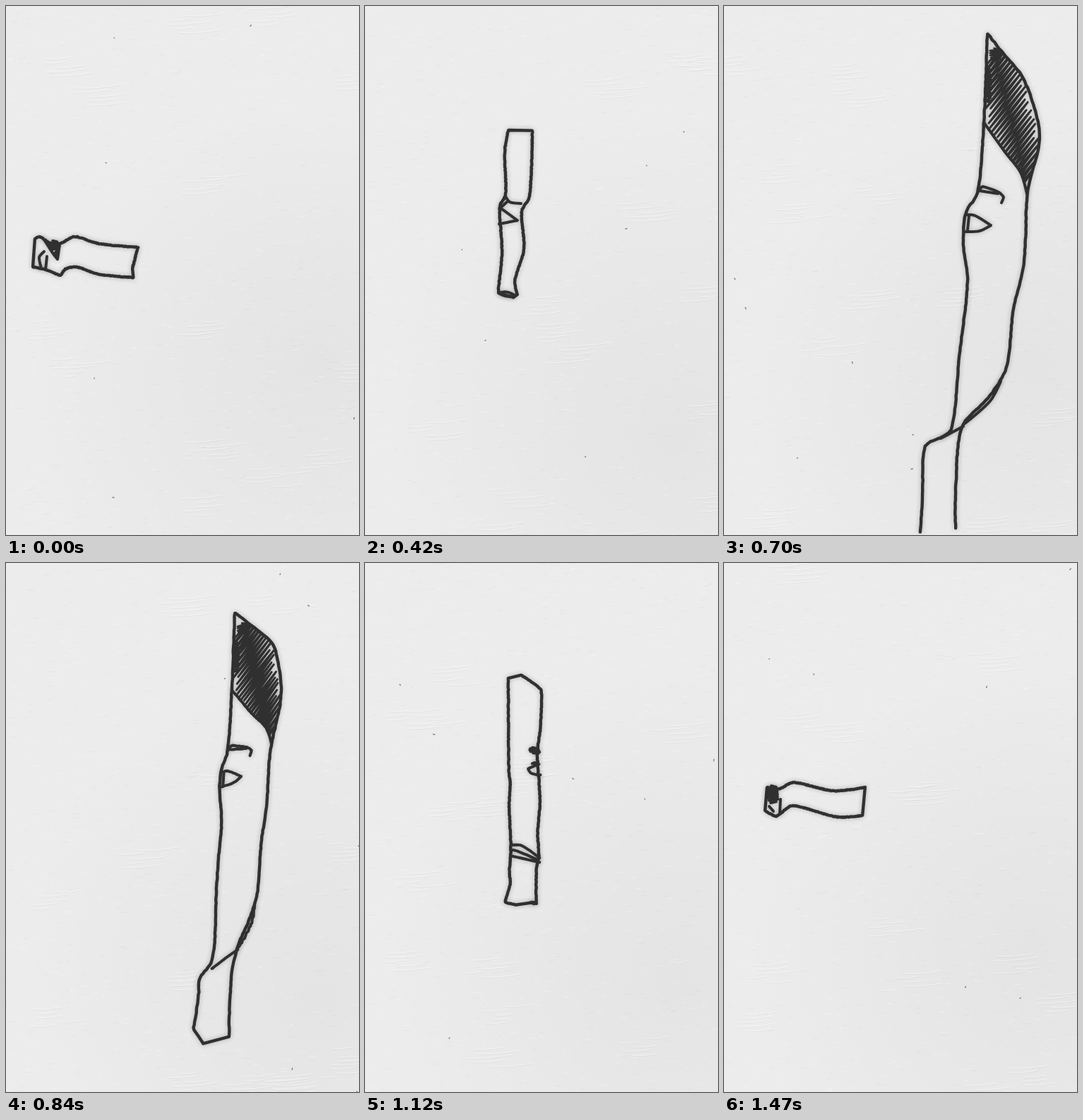
These frames come from a looping animation (500 px wide and 750 px high, 1540 ms). An HTML page with a canvas:

```html
<!DOCTYPE html>
<html lang="en">
<head>
<meta charset="utf-8">
<title>Paper strip face</title>
<style>
html, body { margin: 0; width: 100%; height: 100%; overflow: hidden; background: #ececec; }
canvas { display: block; width: 500px; height: 750px; }
</style>
</head>
<body>
<canvas id="stage" width="500" height="750"></canvas>
<script>
const ctx = document.getElementById('stage').getContext('2d');
const STEP = 70, COUNT = 22, SAMPLES = 150;

const points = s => s.split(' ').map(p => p.split(',').map(Number));
const mix = (p, q, u) => [p[0] + (q[0] - p[0]) * u, p[1] + (q[1] - p[1]) * u];
const gap = (p, q) => Math.hypot(q[0] - p[0], q[1] - p[1]);
const series = (n, f) => Array.from({ length: n + 1 }, (_, i) => f(i / n, i));

function random(seed) {
  let s = seed * 7919 + 17;
  return () => {
    s = (s + 0x6d2b79f5) | 0;
    let x = Math.imul(s ^ (s >>> 15), 1 | s);
    x ^= x + Math.imul(x ^ (x >>> 7), 61 | x);
    return ((x ^ (x >>> 14)) >>> 0) / 4294967296;
  };
}
const hand = random(5);

// Smooth curve through a few points; sharp turns stay corners.
function curve(pts) {
  const slopes = pts.map((p, i) => {
    const q = pts[i - 1] || p, r = pts[i + 1] || p;
    const l = gap(q, p), m = gap(p, r), n = gap(q, r);
    if (!l || !m || !n) return [0, 0];
    const cos = ((p[0] - q[0]) * (r[0] - p[0]) + (p[1] - q[1]) * (r[1] - p[1])) / (l * m);
    const k = Math.max(0, cos) / n;
    return [(r[0] - q[0]) * k, (r[1] - q[1]) * k];
  });
  const out = [pts[0]];
  for (let i = 1; i < pts.length; i++) {
    const p = pts[i - 1], q = pts[i], len = gap(p, q), steps = Math.ceil(len / 3) || 1;
    for (let j = 1; j <= steps; j++) {
      const u = j / steps, ease = u * u * (3 - 2 * u);
      const h = u * (1 - u) * (1 - u) * len, g = u * u * (u - 1) * len;
      out.push([0, 1].map(c => p[c] + (q[c] - p[c]) * ease + slopes[i - 1][c] * h + slopes[i][c] * g));
    }
  }
  return out;
}

// Evenly spaced points along a polyline.
function resample(pts) {
  const runs = pts.slice(1).map((p, i) => gap(pts[i], p));
  const total = runs.reduce((x, y) => x + y, 0);
  let i = 0, before = 0;
  return series(SAMPLES, t => {
    while (i < runs.length - 1 && before + runs[i] < total * t) before += runs[i++];
    return mix(pts[i], pts[i + 1], Math.min(1, (total * t - before) / runs[i]));
  });
}

const lines = s => s.split('|').map(l => curve(points(l)));
const ring = (x, y, r) => series(20, u => [x + r * Math.cos(u * 6.283), y + r * Math.sin(u * 6.283)]);
const arc = (x0, y0, x1, y1, h) => series(16, u => [x0 + (x1 - x0) * u, y0 + (y1 - y0) * u + h * Math.sin(u * Math.PI)]);
const almond = (x0, y0, x1, y1, up, down) => [arc(x0, y0, x1, y1, -up), arc(x0, y0, x1, y1, down)];
const scribble = (x, y, w, h) => series(Math.ceil(h) + 2, (u, i) => {
  const reach = w * Math.sqrt(1.1 - (2 * u - 1) ** 2) * (.75 + hand() * .35);
  return [x + (i % 2 ? reach : -reach), y + h * (2 * u - 1)];
});
const hatching = () => series(54, (u, i) => {
  const side = (i % 2 ? 1 : -1) * (.8 + hand() * .35);
  return [383 + 46 * u + 23 * side, 68 + 180 * u - 29 * side];
});

// a and b are the long edges of the strip, head to tail; marks are pen lines on it.
const poses = [
  {
    at: 0,
    a: '38,370 57,374 77,382 84,373 100,370 130,380 180,385',
    b: '41,330 48,327 62,336 76,337 97,327 132,337 187,342 179,372',
    marks: [...lines('54,331 66,350 73,359 76,338|54,348 47,356 50,372|58,355 56,374'), scribble(68, 339, 7, 6), scribble(72, 351, 2, 4)]
  },
  {
    at: 2,
    a: '75,333 78,329 113,331 160,333 205,335 220,328',
    b: '79,292 104,288 126,292 158,283 185,281 217,285 219,305',
    marks: [...almond(135, 308, 213, 309, 18, 10), ...almond(136, 334, 184, 334, 3, 5), ring(174, 304, 14),
      scribble(173, 303, 5, 5), scribble(106, 289, 7, 1), scribble(208, 310, 4, 1)]
  },
  {
    at: 6,
    a: '203,176 198,206 199,268 191,284 194,350 189,406 210,413',
    b: '237,177 233,270 222,291 225,345 212,390 216,409',
    marks: [...lines('199,270 205,278 221,280|192,286 203,276|190,309 216,304 194,288'), ...almond(189, 407, 212, 410, 3, 3)]
  },
  {
    at: 10, open: true,
    a: '373,40 368,165 359,265 343,292 339,335 345,390 334,490 321,602 285,624 281,700 278,746',
    b: '374,40 392,63 425,105 447,183 430,265 427,330 424,370 410,430 400,512 377,552 337,597 328,690 328,740',
    marks: lines('339,596 307,613|341,592 377,560 392,532|360,263 366,256 389,264 396,271 393,279|362,262 388,266|' +
      '343,296 355,297 378,311 362,319 342,320|347,298 345,318'),
    hairline: curve(points('368,165 398,207 420,236 429,266')),
    hair: [hatching(), scribble(385, 69, 9, 9), scribble(375, 112, 4, 24)]
  },
  {
    at: 14,
    a: '275,102 270,237 266,320 268,340 261,400 264,500 261,550 264,575 250,617 281,617',
    b: '276,102 302,111 333,128 330,210 317,270 315,300 312,440 316,503 309,525 304,604',
    marks: [...lines('264,486 284,484 317,505|264,497 280,499 314,511|265,511 315,515|316,294 299,307 303,316 317,319'),
      scribble(313, 263, 8, 6), scribble(312, 293, 5, 2), scribble(301, 607, 4, 1)]
  },
  {
    at: 18,
    a: '131,225 137,258 149,303 145,352',
    b: '166,216 168,262 183,297 176,320 181,357',
    marks: [...lines('150,293 171,286|149,307 177,315|163,291 160,300 164,309'), ring(173, 300, 8),
      scribble(173, 300, 3, 3), scribble(152, 249, 15, 4)]
  },
  {
    at: 21,
    a: '58,351 74,359 97,344 160,360 196,358',
    b: '61,318 79,320 98,311 155,323 200,318',
    marks: [...lines('80,335 79,355|64,345 70,352'), scribble(69, 328, 8, 12)]
  }
];

// Ties a point to the strip: nearest cross line, place across it, leftover offset.
function pin(pose, p) {
  let best = { d: Infinity };
  pose.a.forEach((q, i) => {
    const r = pose.b[i], w = gap(q, r) || 1;
    const across = ((p[0] - q[0]) * (r[0] - q[0]) + (p[1] - q[1]) * (r[1] - q[1])) / (w * w);
    const v = Math.min(1, Math.max(0, across)), at = mix(q, r, v), d = gap(at, p);
    if (d < best.d) best = { d, i, v, dx: p[0] - at[0], dy: p[1] - at[1] };
  });
  return best;
}

for (const pose of poses) {
  pose.a = resample(curve(points(pose.a)));
  pose.b = resample(curve(points(pose.b)));
  const tie = line => line.map(p => pin(pose, p));
  pose.marks = pose.marks.map(tie);
  if (pose.hair) {
    pose.hair = pose.hair.map(tie);
    pose.hairline = tie(pose.hairline);
  }
}

function trace(...runs) {
  const path = new Path2D();
  for (const run of runs) run.forEach(([x, y], i) => i ? path.lineTo(x, y) : path.moveTo(x, y));
  return path;
}

function paper(rnd) {
  ctx.fillStyle = '#ececec';
  ctx.fillRect(0, 0, 500, 750);
  const shade = ctx.createRadialGradient(440, 500 + rnd() * 150, 0, 440, 550, 420);
  shade.addColorStop(0, 'rgba(0,0,0,.035)');
  shade.addColorStop(1, 'rgba(0,0,0,0)');
  ctx.fillStyle = shade;
  ctx.fillRect(0, 0, 500, 750);

  const fibre = (x, y, len, color) => {
    ctx.strokeStyle = color;
    ctx.beginPath();
    ctx.moveTo(x, y);
    ctx.quadraticCurveTo(x + len / 2, y + 1, x + len, y - len * .08);
    ctx.stroke();
  };
  ctx.lineWidth = 1;
  for (let i = 0; i < 900; i++) {
    fibre(rnd() * 510 - 10, rnd() * 750, 2 + rnd() * 9, i % 2 ? 'rgba(255,255,255,.3)' : 'rgba(0,0,0,.03)');
  }
  for (let i = 0; i < 14; i++) {
    const x = rnd() * 500 - 30, y = rnd() * 750;
    for (let j = 0; j < 5; j++) {
      const fx = x + rnd() * 40, fy = y + j * 6, len = 20 + rnd() * 45;
      fibre(fx, fy, len, 'rgba(255,255,255,.4)');
      fibre(fx, fy + 1.5, len, 'rgba(0,0,0,.03)');
    }
  }
  ctx.fillStyle = 'rgba(45,45,45,.55)';
  for (let i = 0; i < 6; i++) {
    ctx.beginPath();
    ctx.ellipse(rnd() * 500, rnd() * 750, 1 + rnd(), .8, rnd() * 3, 0, 7);
    ctx.fill();
  }
}

function draw(n) {
  const rnd = random(n + 1);
  let k = poses.length - 1;
  while (poses[k].at > n) k--;
  const from = poses[k], to = poses[(k + 1) % poses.length];
  const u = (n - from.at) / ((to.at || COUNT) - from.at);
  const near = u <= .5 ? from : to;
  const a = from.a.map((p, i) => mix(p, to.a[i], u));
  const b = from.b.map((p, i) => mix(p, to.b[i], u));
  const place = line => line.map(({ i, v, dx, dy }) => {
    const [x, y] = mix(a[i], b[i], v);
    return [x + dx, y + dy];
  });
  const shake = ([x, y]) => [x + (rnd() - .5) * .8, y + (rnd() - .5) * .8];

  paper(rnd);
  ctx.save();
  ctx.lineCap = ctx.lineJoin = 'round';
  ctx.strokeStyle = '#303030';
  ctx.shadowColor = 'rgba(30,30,30,.3)';
  ctx.shadowBlur = 6;
  ctx.lineWidth = 4.4;
  const strip = trace([...a.slice().reverse(), ...b].map(shake));
  if (u || !near.open) strip.closePath();
  ctx.stroke(strip);
  ctx.lineWidth = 4;
  ctx.stroke(trace(...near.marks.map(place)));

  if (near.hair) {
    const edge = place(near.hairline), ends = near.hairline;
    ctx.stroke(trace(edge));
    ctx.clip(trace([...a.slice(0, ends[0].i), ...edge, ...b.slice(0, ends[ends.length - 1].i).reverse()]));
    ctx.lineWidth = 2.8;
    ctx.stroke(trace(...near.hair.map(place)));
  }
  ctx.restore();
}

let shown = -1;
function tick() {
  const n = Math.floor(performance.now() / STEP) % COUNT;
  if (n !== shown) draw(shown = n);
  requestAnimationFrame(tick);
}
tick();
</script>
</body>
</html>
```
